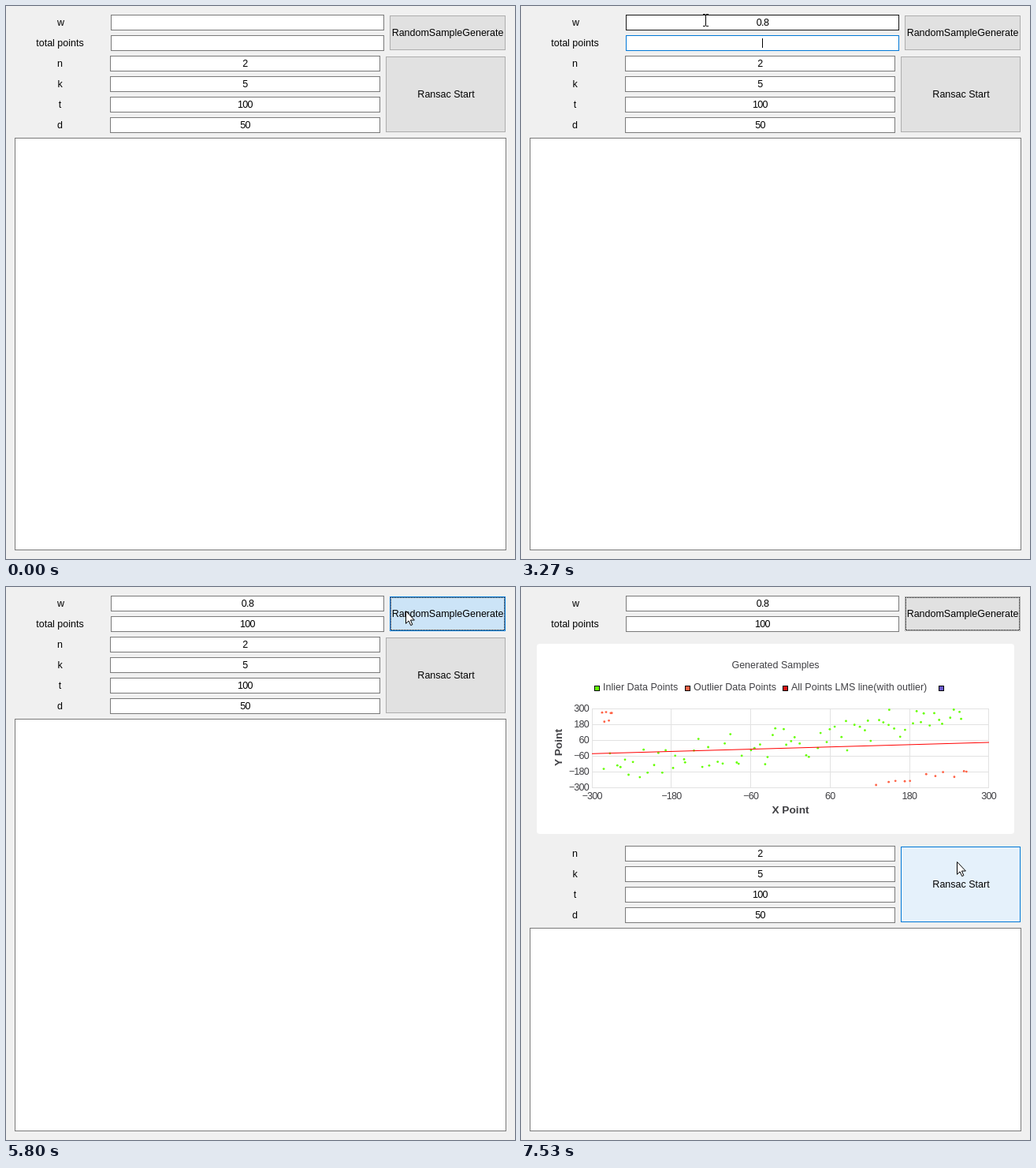
These frames come from a looping animation (646 px wide and 701 px high, 8000 ms). An HTML page:

```html
<!DOCTYPE html>
<html lang="en">
<head>
<meta charset="utf-8">
<title>RANSAC demo</title>
<style>
  html, body { margin: 0; width: 100%; height: 100%; overflow: hidden; background: #f0f0f0; }
  svg { display: block; font: 12.5px "Liberation Sans", Arial, sans-serif; }
  rect, .grid line { shape-rendering: crispEdges; }
  text { text-anchor: middle; }
  .num { letter-spacing: -0.7px; }
  .field { fill: #fff; stroke: #7a7a7a; }
  .btn { fill: #e1e1e1; stroke: #adadad; }
  .hover { stroke: #171717; }
  .focus { stroke: #0078d7; }
  .btn.hover { fill: #e5f1fb; stroke: #0078d7; }
  .btn.down { fill: #cce4f7; stroke: #0078d7; }
  .dots { fill: none; stroke: #000; stroke-dasharray: 1 1; stroke-dashoffset: .5; }
  .card { fill: #fff; shape-rendering: auto; }
  #chart text { fill: #404044; }
  #chart .start { text-anchor: start; }
  #chart .end { text-anchor: end; }
  #chart .title { font-weight: bold; font-size: 13.7px; }
  .grid { stroke: #e2e2e2; }
  .strips { fill: #f0f0f0; }
</style>
</head>
<body>
<svg id="stage" width="646" height="701" viewBox="0 0 646 701">
  <rect width="646" height="701" fill="#f0f0f0"/>
</svg>
<script>
const LOOP = 8000, STEP = 1000 / 15, ROW = 26, SHIFT = 265;
const stage = document.getElementById('stage');

function add(parent, tag, attrs, text) {
  const el = document.createElementNS('http://www.w3.org/2000/svg', tag);
  for (const name in attrs) el.setAttribute(name, attrs[name]);
  if (text !== undefined) el.textContent = text;
  parent.append(el);
  return el;
}
const group = (parent, attrs) => add(parent, 'g', attrs);
const label = (parent, x, y, text, cls = '') => add(parent, 'text', { x, y, class: cls }, text);
// Outlined box covering the pixels from (x, y) up to (x + w, y + h)
const box = (parent, cls, x, y, w, h) =>
  add(parent, 'rect', { class: cls, x: x + .5, y: y + .5, width: w - 1, height: h - 1 });
const show = (el, on) => el.setAttribute('visibility', on ? 'visible' : 'hidden');

// Top form
label(stage, 69.5, 25, 'w');
label(stage, 68.5, 51, 'total points');
const ratio = box(stage, 'field', 133, 11, 347, 20);
const total = box(stage, 'field', 133, 37, 347, 20);
const ratioText = label(stage, 306.5, 25, '', 'num');
const totalText = label(stage, 306.5, 51, '', 'num');
const caret = add(stage, 'rect', { width: 1, height: 12 });
const generate = box(stage, 'btn', 487, 12, 147, 44);
const focusRing = box(stage, 'dots', 488, 13, 145, 42);
label(stage, 560.5, 38, 'RandomSampleGenerate');

// Lower form
const lower = group(stage);
Object.entries({ n: 2, k: 5, t: 100, d: 50 }).forEach(([name, value], i) => {
  const y = 63 + ROW * i;
  label(lower, 68.5, y + 14, name);
  box(lower, 'field', 132, y, 343, 20);
  label(lower, 303.5, y + 14, value, 'num');
});
const start = box(lower, 'btn', 482, 64, 152, 96);
label(lower, 558.5, 116, 'Ransac Start');
const panel = box(stage, 'field', 11, 167, 624, 523);

// Chart
const chart = group(stage, { id: 'chart' });
add(chart, 'rect', { class: 'card', x: 20, y: 72, width: 606, height: 241, rx: 4 });
label(chart, 323, 103, 'Generated Samples');
[[93, '#66ff00', 'Inlier Data Points'], [208, '#ff6347', 'Outlier Data Points'],
 [332, '#d81414', 'All Points LMS line(with outlier)'], [530, '#6a5acd', '']]
  .forEach(([x, fill, text]) => {
    add(chart, 'rect', { x: x + .5, y: 125.5, width: 6, height: 6, fill, stroke: '#000' });
    label(chart, x + 11, 131, text, 'start');
  });
const grid = group(chart, { class: 'grid' });
for (let i = 0; i < 6; i++) {
  const x = 90.2 + 100.7 * i, y = 154 + 20 * i, v = 300 - 120 * i;
  const signed = n => String(n).replace('-', '\u2212');
  add(grid, 'line', { x1: x, x2: x, y1: 154, y2: 254 });
  add(grid, 'line', { x1: 90, x2: 594, y1: y, y2: y });
  label(chart, 86, y + 4, signed(v), 'num end');
  label(chart, x, 269, signed(-v), 'num');
}
label(chart, 342, 287, 'X Point', 'title');
add(chart, 'text', { class: 'title', transform: 'translate(52 203.5) rotate(-90)' }, 'Y Point');

// Samples spread evenly from x0 to x1 around a straight trend, inside the plot
let seed = 11;
const random = () => (seed = seed * 16807 % 2147483647) / 2147483647;
function scatter(fill, count, x0, y0, x1, y1, noise) {
  for (let i = 0; i < count; i++) {
    const f = (i + random()) / count;
    const y = y0 + (y1 - y0) * f + noise * (2 * random() - 1);
    add(chart, 'circle', { cx: x0 + (x1 - x0) * f, cy: Math.min(251, Math.max(155.5, y)), r: 1.4, fill });
  }
}
scatter('#66ff00', 76, 105, 233, 564, 163, 23);
scatter('#ff6347', 6, 102, 164, 117, 164, 8);
scatter('#ff6347', 11, 447, 249, 575, 234, 4);
add(chart, 'line', { x1: 90, y1: 211.3, x2: 594, y2: 197, stroke: '#f00' });

// Stale background left between the old widgets during the first repaint
const strips = group(chart, { class: 'strips' });
for (let i = 0; i < 3; i++)
  add(strips, 'rect', { x: 20, y: 83 + ROW * i, width: 461, height: 6 });
add(strips, 'rect', { x: 20, y: 161, width: 606, height: 6 });
for (const x of [126, 475])
  add(strips, 'rect', { x, y: 72, width: 6, height: 95 });

// Pointers, with the hot spot at the origin
const beam = add(stage, 'path', { fill: 'none', stroke: '#000', 'shape-rendering': 'crispEdges',
  d: 'M-3 -7.5H0M1 -7.5H4M.5 -7V7M-3 7.5H0M1 7.5H4' });
const arrow = add(stage, 'path', { fill: '#fff', stroke: '#000',
  d: 'M.5 .5V16.3L4.1 12.9L6.7 18.6L8.9 17.6L6.4 12H11.4Z' });

// Ticks of the main events
const ENTER = 4, CLICK_RATIO = 17, TAB = 49, PRESS = 87, RELEASE = 90;

// Each move glides from where the last one ended
const moves = [
  { from: 4, to: 5, x: 218, y: 81 },
  { from: 7, to: 17, x: 234, y: 18 },
  { from: 71, to: 76, x: 446, y: 12 },
  { from: 76, to: 78, x: 496, y: 8 },
  { from: 78, to: 83, x: 507, y: 30 },
  { from: 97, to: 110, x: 543, y: 336 },
  { from: 111, to: 113, x: 553, y: 348 },
];

function pointerAt(k) {
  let x = 205, y = 21;
  for (const m of moves) {
    const f = Math.min(1, Math.max(0, (k - m.from) / (m.to - m.from)));
    x += (m.x - x) * f;
    y += (m.y - y) * f;
  }
  return { x: Math.round(x), y: Math.round(y) };
}

const typed = (text, keys, k) => text.slice(0, keys.filter(key => key <= k).length);
const textWidth = s => [...s].reduce((sum, c) => sum + (c === '.' ? 4 : 6), 0);
const within = (k, from, to) => k >= from && k < to;

function draw(time) {
  const k = Math.floor((time + 4) / STEP);
  const p = pointerAt(k), entered = k >= ENTER, clicked = k >= PRESS, open = k >= RELEASE;
  const over = (x, y, w, h) => entered && within(p.x, x, x + w) && within(p.y, y, y + h);
  const overRatio = over(133, 11, 347, 20), overTotal = over(133, 37, 347, 20);
  const inRatio = within(k, CLICK_RATIO, TAB), inTotal = within(k, TAB, PRESS);
  const style = (el, base, state) => el.setAttribute('class', `${base} ${state}`);

  style(ratio, 'field', overRatio ? 'hover' : inRatio ? 'focus' : '');
  style(total, 'field', overTotal ? 'hover' : inTotal ? 'focus' : '');
  style(generate, 'btn', clicked && !open ? 'down' : over(487, 12, 147, 44) ? 'hover' : '');
  style(start, 'btn', open && over(482, 64 + SHIFT, 152, 96) ? 'hover' : '');
  show(focusRing, clicked);

  ratioText.textContent = typed('0.8', [32, 36, 42], k);
  totalText.textContent = typed('100', [56, 60, 63], k);
  const width = textWidth((inTotal ? totalText : ratioText).textContent);
  caret.setAttribute('x', Math.floor(306 + width / 2));
  caret.setAttribute('y', inTotal ? 41 : 15);
  show(caret, (inRatio || inTotal) && !within(k, 26, 32) && !within(k, 72, 80));

  lower.setAttribute('transform', `translate(0 ${open ? SHIFT : 0})`);
  panel.setAttribute('y', 167.5 + (open ? SHIFT : 0));
  panel.setAttribute('height', 522 - (open ? SHIFT : 0));
  show(chart, open);
  show(strips, k === RELEASE);

  const onText = p.x < 480;
  show(beam, entered && onText);
  show(arrow, entered && !onText);
  for (const el of [beam, arrow]) el.setAttribute('transform', `translate(${p.x} ${p.y})`);
}

const origin = performance.now();
function tick() {
  draw((performance.now() - origin) % LOOP);
  requestAnimationFrame(tick);
}
tick();
</script>
</body>
</html>
```
